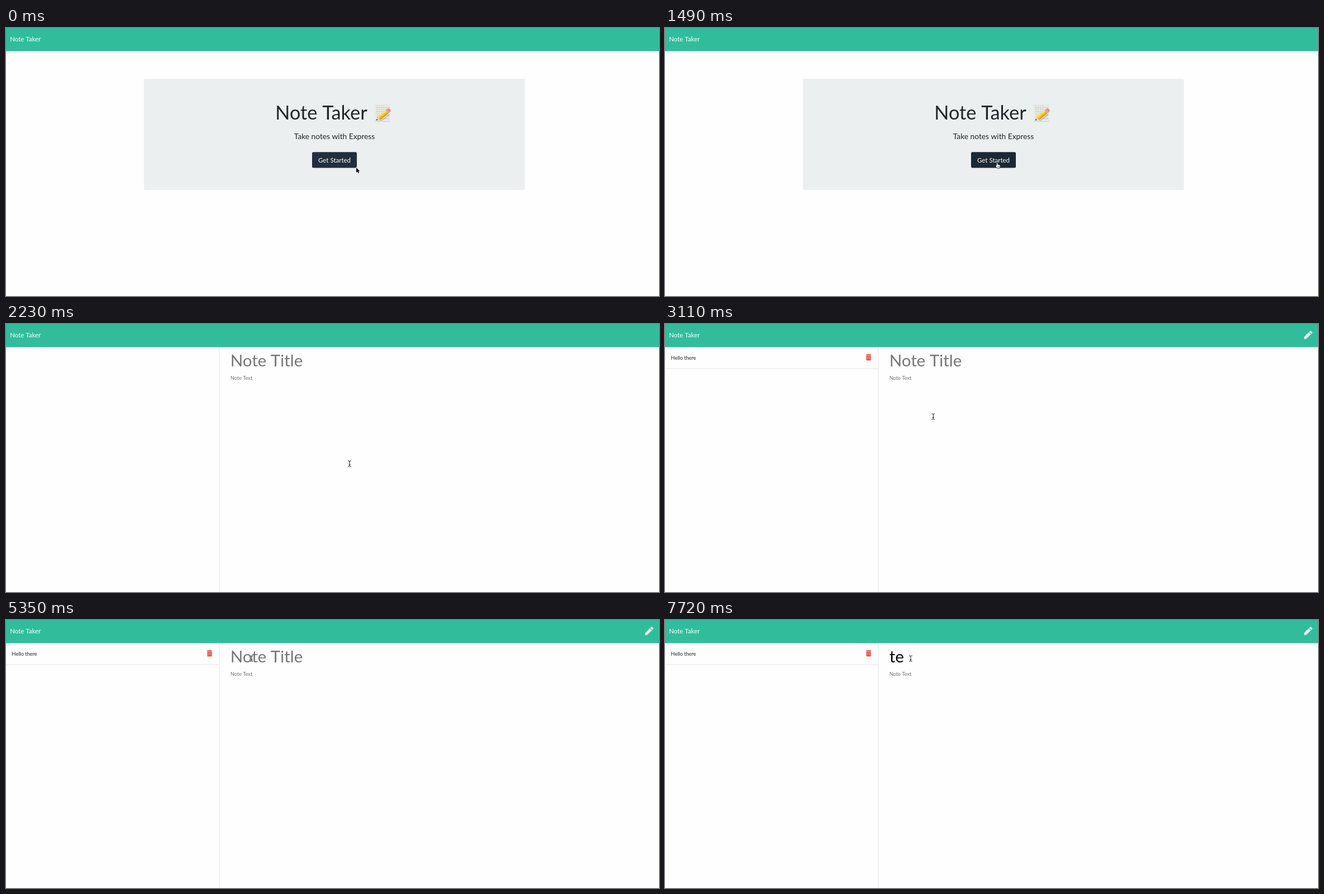
An HTML page with a canvas that plays this animation: 1167x480 px, repeating every 8000 ms.

```html
<!DOCTYPE html>
<html lang="en">
<head>
<meta charset="utf-8">
<title>Note Taker</title>
<style>
  html, body { margin: 0; width: 100%; height: 100%; overflow: hidden; background: #fefefe; }
  canvas { display: block; }
</style>
</head>
<body>
<canvas id="stage" width="1167" height="480"></canvas>
<script>
const ctx = document.getElementById('stage').getContext('2d');
const LOOP = 8000;
const OPEN = 2230, PEN = 2370, LIST = 2670, FOCUS = 1930;

// start, end, steps, from x, from y, to x, to y
const moves = [
  [150, 440, 3, 626, 250, 596, 245],
  [1490, 2080, 5, 596, 245, 591, 250],
  [2230, 2520, 3, 638, 272.5, 566, 205],
  [2670, 3700, 8, 566, 205, 392.5, 126.5],
  [3850, 4000, 2, 396, 131, 447, 83],
  [4150, 4300, 2, 447, 83, 444.5, 96],
  [4600, 4900, 3, 444.5, 96, 439, 69]
];

// time, typed title, caret shown
const typing = [
  [0, '', false], [4900, '', true], [5350, '', false],
  [5790, 'te', true], [6090, 'tets', true], [6240, 'tets ', true],
  [6690, 'tets ', false], [7280, 'tets', true], [7430, 'tet', true],
  [7570, 'te', true], [7720, 'te', false]
];

const lastBefore = (list, t) => list.filter(item => item[0] <= t).pop();

function pointer(t) {
  const move = lastBefore(moves, t);
  if (!move) return { x: 626, y: 250 };
  const [start, end, steps, x0, y0, x1, y1] = move;
  const gap = (end - start) / (steps - 1);
  const k = Math.min(steps, Math.floor((t - start) / gap + 0.04) + 1) / steps;
  return { x: x0 + (x1 - x0) * k, y: y0 + (y1 - y0) * k };
}

function text(str, x, y, size, color, align = 'left') {
  ctx.font = `400 ${size}px Lato, sans-serif`;
  ctx.textAlign = align;
  ctx.fillStyle = color;
  ctx.fillText(str, x, y);
}

function box(x, y, w, h, color, r = 0) {
  ctx.fillStyle = color;
  ctx.beginPath();
  ctx.roundRect(x, y, w, h, r);
  ctx.fill();
}

function at(x, y, draw, turn = 0) {
  ctx.save();
  ctx.translate(x, y);
  ctx.rotate(turn);
  draw();
  ctx.restore();
}

function shape(d, fill, line, width = 1) {
  const path = new Path2D(d);
  if (line) {
    ctx.strokeStyle = line;
    ctx.lineWidth = width;
    ctx.lineJoin = ctx.lineCap = 'round';
    ctx.stroke(path);
  }
  if (fill) {
    ctx.fillStyle = fill;
    ctx.fill(path);
  }
}

function memo() {
  box(659, 136, 28, 32, '#cfcfcb', 1);
  box(659, 136, 28, 31, '#e9e9e5', 1);
  for (let row = 0; row < 8; row++) {
    for (let x = 662; x < 683; x += 4) {
      const w = 2 + (row * 3 + x) % 2;
      if (row || x < 678) box(x, 139 + row * 3.3, w, 0.8, '#b4b4b0');
    }
  }
  at(661.5, 165.5, () => {
    shape('M1 2L8 5.5H25V7H8Z', 'rgba(0,0,0,.2)');
    shape('M0 0L7-3.8V3.8Z', '#ecca96');
    shape('M0 0L2.6-1.4V1.4Z', '#3a3430');
    box(6.5, -3.8, 18, 7.6, '#f4c526');
    box(6.5, -3.8, 18, 2.4, '#fde066');
    box(6.5, 1.6, 18, 2.2, '#d99a18');
    box(24.5, -3.8, 3, 7.6, '#b4b7b6');
    box(27.5, -3.8, 4.2, 7.6, '#e88f86', [0, 2.5, 2.5, 0]);
  }, -0.67);
}

function arrow() {
  shape('M0 0V9L2.1 7.2L3.5 10.3L5 9.6L3.7 6.6H6.4Z', '#000', '#fff', 1.3);
}

function hand() {
  shape('M-1.6 4.8L-3.9 1.2Q-4-.2-2.2.7V-4Q-1.4-5.2-.6-4V-1Q.5-1.8 1.1-.8Q2.3-1.4 2.7-.3Q4-.6 4 .7L3.2 4.8Z',
    '#fff', '#000', 1.2);
  shape('M-.4 1.4V3.4M1 1.4V3.4M2.4 1.4V3.4', null, '#000', 0.5);
}

function beam() {
  const d = 'M-2.5-5Q-.4-5 0-4Q.4-5 2.5-5M0-4V4M-2.5 5Q-.4 5 0 4Q.4 5 2.5 5M-1.2 1.7H1.2';
  shape(d, null, 'rgba(255,255,255,.8)', 2.2);
  shape(d, null, '#222', 1);
}

function trash() {
  const red = '#e5493a';
  box(359, 54.5, 9.6, 1.5, red, 0.4);
  box(362, 53.7, 3.6, 1.5, red, 0.6);
  box(359.7, 56.8, 8.2, 8.4, red, [0, 0, 1, 1]);
  for (const x of [361.4, 363.5, 365.6]) box(x, 58.2, 0.7, 5.3, '#f9cfca', 0.3);
}

function pen() {
  at(1142, 12, () => shape(
    'M8.5 2.7L12.3 6.5L4.1 14.6L.8 15Q0 15 0 14.2L.4 10.9Z' +
    'M9.2 2.1L10.8 .4Q11.8-.4 12.8 .4L14.6 2.2Q15.4 3.2 14.6 4.2L12.9 5.8Z', '#f5fafa'));
}

function home(t) {
  box(246.5, 91, 681, 199, '#eceff0', 3);
  text('Note Taker', 484.3 - 3, 164, 34.31, '#212529');
  memo();
  text('Take notes with Express', 587, 199, 13.78, '#212529', 'center');
  if (t >= FOCUS) box(545, 220.5, 84, 32, '#96a0a8', 4);
  box(547, 222.3, 80, 28.2, t < 150 ? '#212f3d' : '#1c2833', 2.5);
  text('Get Started', 587, 240.8, 11.49, '#fff', 'center');
}

function notes(t) {
  box(380.6, 41.5, 1, 438.5, '#e3e6e7');
  if (t >= PEN) pen();
  if (t >= LIST) {
    text('Hello there', 10.6, 64.3, 9.19, '#212529');
    trash();
    box(0, 79.5, 381, 1, '#e4e6e7');
  }
  const [, title, caret] = lastBefore(typing, t);
  text(title || 'Note Title', 401, 75.8, 29.4, title ? '#000' : '#757575');
  if (caret) box(401 + Math.round(ctx.measureText(title).width), 50, 1, 31, '#000');
  text('Note Text', 401, 100, 9.19, '#757575');
}

function draw(t) {
  box(0, 0, 1167, 480, '#fefefe');
  box(0, 0, 1167, 41.5, '#31bd9c');
  text('Note Taker', 7.2, 24.3, 11.49, '#fff');
  (t < OPEN ? home : notes)(t);
  const { x, y } = pointer(t);
  const onField = t >= OPEN && x > 399;
  at(x, y, onField ? beam : t < 150 || t >= OPEN ? arrow : hand);
}

const begin = performance.now();
function tick() {
  draw((performance.now() - begin) % LOOP);
  requestAnimationFrame(tick);
}
tick();
</script>
</body>
</html>
```
